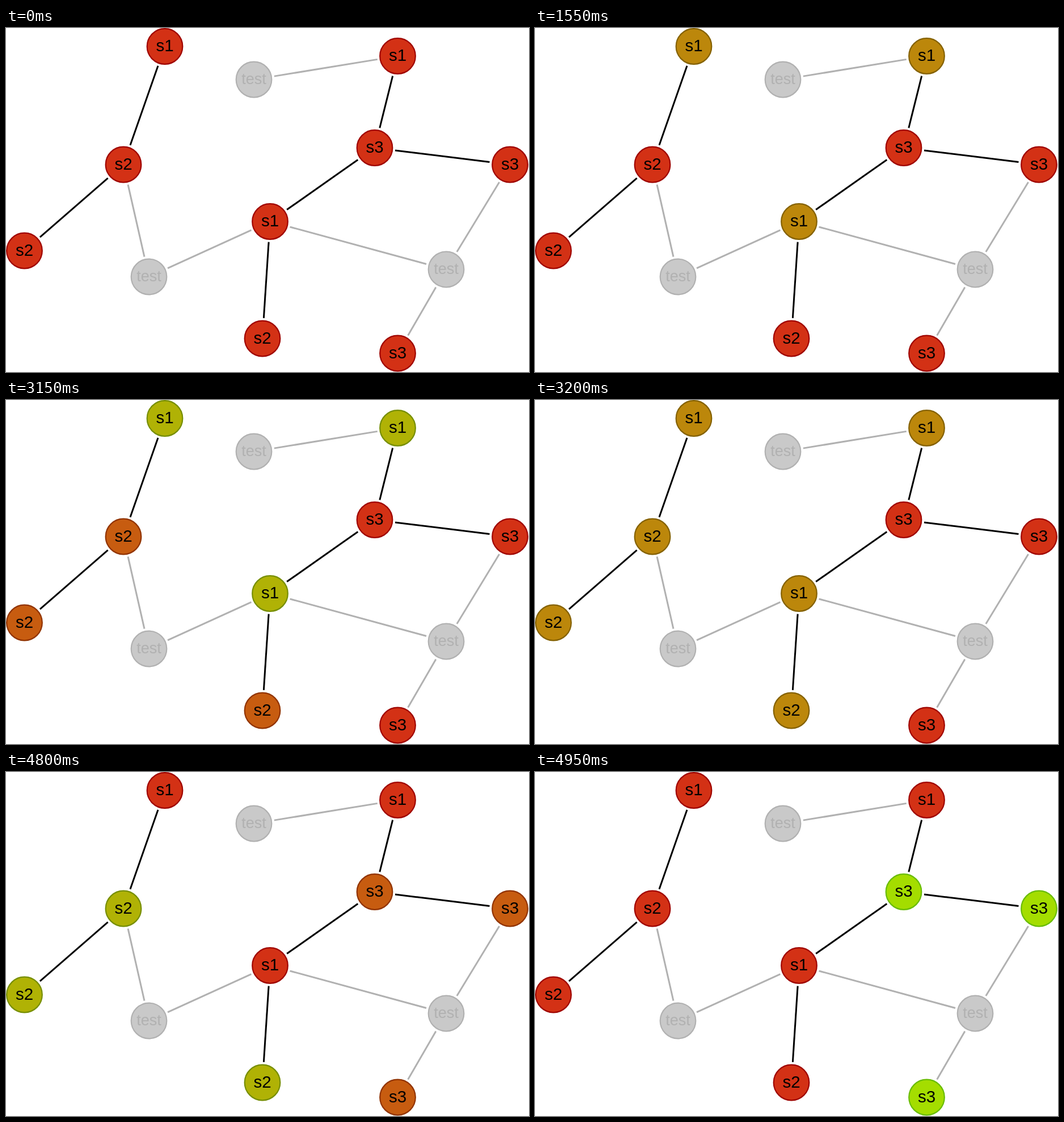
Recreate the animation shown at these times as an HTML page. Size 922 by 607 pixels, loop 6450 ms.

```html
<!DOCTYPE html>
<html lang="en">
<head>
<meta charset="utf-8">
<title>Node graph</title>
<style>
  html, body { margin: 0; width: 100%; height: 100%; overflow: hidden; background: #fff; }
  svg { display: block; width: 922px; height: 607px; }
  circle { stroke-width: 2.2; }
  line { stroke: #000; stroke-width: 3; }
  line.muted { stroke: #b1b1b1; }
  text { font-family: "Liberation Sans", Arial, sans-serif; font-size: 29.5px; text-anchor: middle; }
  .muted circle { fill: #c9c9c9; stroke: #b1b1b1; }
  .muted text { fill: #b1b1b1; font-size: 27px; }
</style>
</head>
<body>
<svg id="graph" viewBox="0 0 922 607"></svg>
<script>
const LOOP = 6450, HOLD = 1500, FADE = 150, STEP = 50, STEPS = 4;
const RADIUS = 31.3, GAP = 36.3;
const FILL = { off: [211, 49, 21], on: [164, 221, 0] };
const STROKE = { off: [159, 5, 0], on: [104, 188, 0] };

// x, y, label
const nodes = [
  [280, 32.5, "s1"], [690.5, 49.5, "s1"], [465.5, 341.5, "s1"],
  [207, 241, "s2"], [32.5, 393, "s2"], [452, 548, "s2"],
  [650, 211.5, "s3"], [888.5, 241, "s3"], [690.5, 574, "s3"],
  [437, 91, "test"], [252, 439, "test"], [776, 426, "test"]
];
const edges = [
  [0, 3], [3, 4], [1, 6], [6, 7], [6, 2], [2, 5],
  [1, 9], [3, 10], [2, 10], [2, 11], [7, 11], [8, 11]
];
const isMuted = i => nodes[i][2] === "test";
const graph = document.getElementById("graph");

function add(parent, tag, attributes) {
  const element = document.createElementNS("http://www.w3.org/2000/svg", tag);
  for (const name in attributes) element.setAttribute(name, attributes[name]);
  return parent.appendChild(element);
}

for (const [a, b] of edges) {
  const [x1, y1] = nodes[a], [x2, y2] = nodes[b];
  const length = Math.hypot(x2 - x1, y2 - y1);
  const dx = (x2 - x1) / length * GAP, dy = (y2 - y1) / length * GAP;
  add(graph, "line", {
    x1: x1 + dx, y1: y1 + dy, x2: x2 - dx, y2: y2 - dy,
    class: isMuted(a) || isMuted(b) ? "muted" : ""
  });
}

const groups = [[], [], []];
nodes.forEach(([x, y, label], i) => {
  const node = add(graph, "g", { class: isMuted(i) ? "muted" : "" });
  const circle = add(node, "circle", { cx: x, cy: y, r: RADIUS });
  add(node, "text", { x, y: y + (isMuted(i) ? 7.5 : 8.5) }).textContent = label;
  if (!isMuted(i)) groups[label[1] - 1].push(circle);
});

const mix = ({ off, on }, k) =>
  `rgb(${off.map((v, i) => Math.round(v + (on[i] - v) * k))})`;

// Stepped rise from 0 to 1 at the start of the given group's turn.
function rise(time, group) {
  const start = HOLD + group * (HOLD + FADE);
  const step = Math.floor((time - start) / STEP) + 1;
  return Math.max(0, Math.min(STEPS, step)) / STEPS;
}

function draw(now) {
  const time = now % LOOP;
  groups.forEach((circles, g) => {
    const k = rise(time, g) - rise(time, g + 1);
    for (const circle of circles) {
      circle.setAttribute("fill", mix(FILL, k));
      circle.setAttribute("stroke", mix(STROKE, k));
    }
  });
}

let origin;
function tick(now) {
  origin ??= now;
  draw(now - origin);
  requestAnimationFrame(tick);
}
draw(0);
requestAnimationFrame(tick);
</script>
</body>
</html>
```
